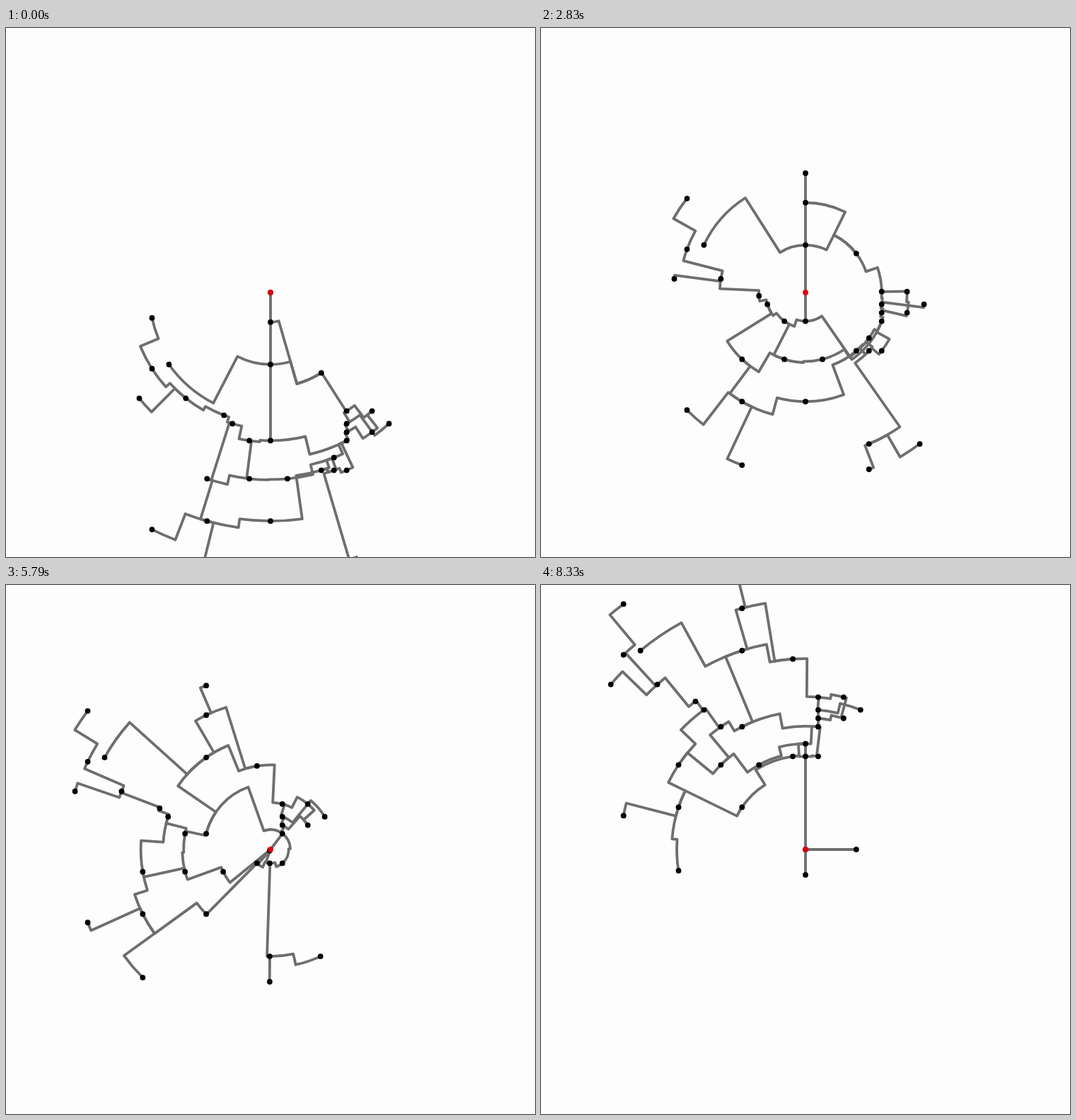
These frames come from a looping animation (748x748 px, 8.37 s). An HTML page with a canvas:

```html
<!DOCTYPE html>
<html lang="en">
<head>
<meta charset="utf-8">
<title>Polar graph walk</title>
<style>
  html, body { margin: 0; width: 100%; height: 100%; overflow: hidden; background: #fdfdfd; }
  canvas { display: block; }
</style>
</head>
<body>
<canvas id="stage" width="748" height="748"></canvas>
<script>
const ctx = document.getElementById("stage").getContext("2d");
const SIZE = 748, MID = SIZE / 2, UNIT = SIZE / 125;
const LOOP = 8370, STEPS = 200;

// Node positions in grid units
const nodes = {
  a: [0, 0], b: [0, 7], c: [0, 17], d: [0, 35], e: [12, 19],
  f: [18, 28], g: [24, 28], h: [18, 31], i: [18, 33], j: [24, 33],
  k: [28, 31], l: [18, 35], m: [15, 39], n: [12, 42], o: [15, 42],
  p: [18, 42], q: [4, 44], r: [-5, 44], s: [-5, 35], t: [-9, 31],
  u: [-11, 29], v: [-20, 25], w: [-28, 18], x: [-28, 6], y: [-31, 25],
  z: [-24, 17], A: [-15, 44], B: [-15, 54], C: [0, 54], D: [-28, 56],
  E: [-15, 69], F: [15, 64], G: [27, 64], H: [15, 70]
};
const edges = ("ab bc cd be ce cz ef fg fh hi hk ij gj il dl ds st tu uv vw wx vy " +
  "sr rq rA tA AB BC BD BE Cn qm lm lp mn mo no op oF FG FH").split(" ");
const route = [..."adlmF"].map(id => nodes[id]);

const legs = route.slice(1).map((p, i) => Math.hypot(p[0] - route[i][0], p[1] - route[i][1]));
const total = legs.reduce((sum, len) => sum + len, 0);

function pointAlong(dist) {
  let i = 0;
  while (i < legs.length - 1 && dist > legs[i]) dist -= legs[i++];
  const k = Math.min(1, dist / legs[i]), [p, q] = [route[i], route[i + 1]];
  return [p[0] + (q[0] - p[0]) * k, p[1] + (q[1] - p[1]) * k];
}

function polar([x, y], centre) {
  const dx = (x - centre[0]) * UNIT, dy = (y - centre[1]) * UNIT;
  return { x: MID + dx, y: MID + dy, r: Math.hypot(dx, dy), angle: Math.atan2(dy, dx) };
}

// Arc to the middle angle, radial line, arc to the other end
function drawEdge(p, q) {
  let turn = q.angle - p.angle;
  turn -= 2 * Math.PI * Math.round(turn / (2 * Math.PI));
  ctx.beginPath();
  if (Math.min(p.r, q.r) < 1e-6 || Math.abs(turn) > Math.PI - 1e-6) {
    ctx.moveTo(p.x, p.y);
    ctx.lineTo(q.x, q.y);
  } else {
    const mid = p.angle + turn / 2, back = turn < 0;
    ctx.arc(MID, MID, p.r, p.angle, mid, back);
    ctx.arc(MID, MID, q.r, mid, p.angle + turn, back);
  }
  ctx.stroke();
}

function dot(x, y, colour) {
  ctx.fillStyle = colour;
  ctx.beginPath();
  ctx.arc(x, y, 3.9, 0, 2 * Math.PI);
  ctx.fill();
}

function draw(time) {
  // 24 steps per second, on a 10 ms clock
  const tick = Math.floor((time % LOOP) / 10);
  const step = Math.min(STEPS, Math.ceil((tick + 0.5) * 6 / 25) - 1);
  const centre = pointAlong(total * step / STEPS);
  const at = {};
  for (const id in nodes) at[id] = polar(nodes[id], centre);

  ctx.fillStyle = "#fdfdfd";
  ctx.fillRect(0, 0, SIZE, SIZE);
  ctx.strokeStyle = "#6e6e6e";
  ctx.lineWidth = 3.8;
  ctx.lineJoin = "round";
  for (const [p, q] of edges) drawEdge(at[p], at[q]);
  for (const id in at) dot(at[id].x, at[id].y, "#000");
  dot(MID, MID, "#e0000f");
}

const start = performance.now();
function loop() {
  draw(performance.now() - start);
  requestAnimationFrame(loop);
}
loop();
</script>
</body>
</html>
```
